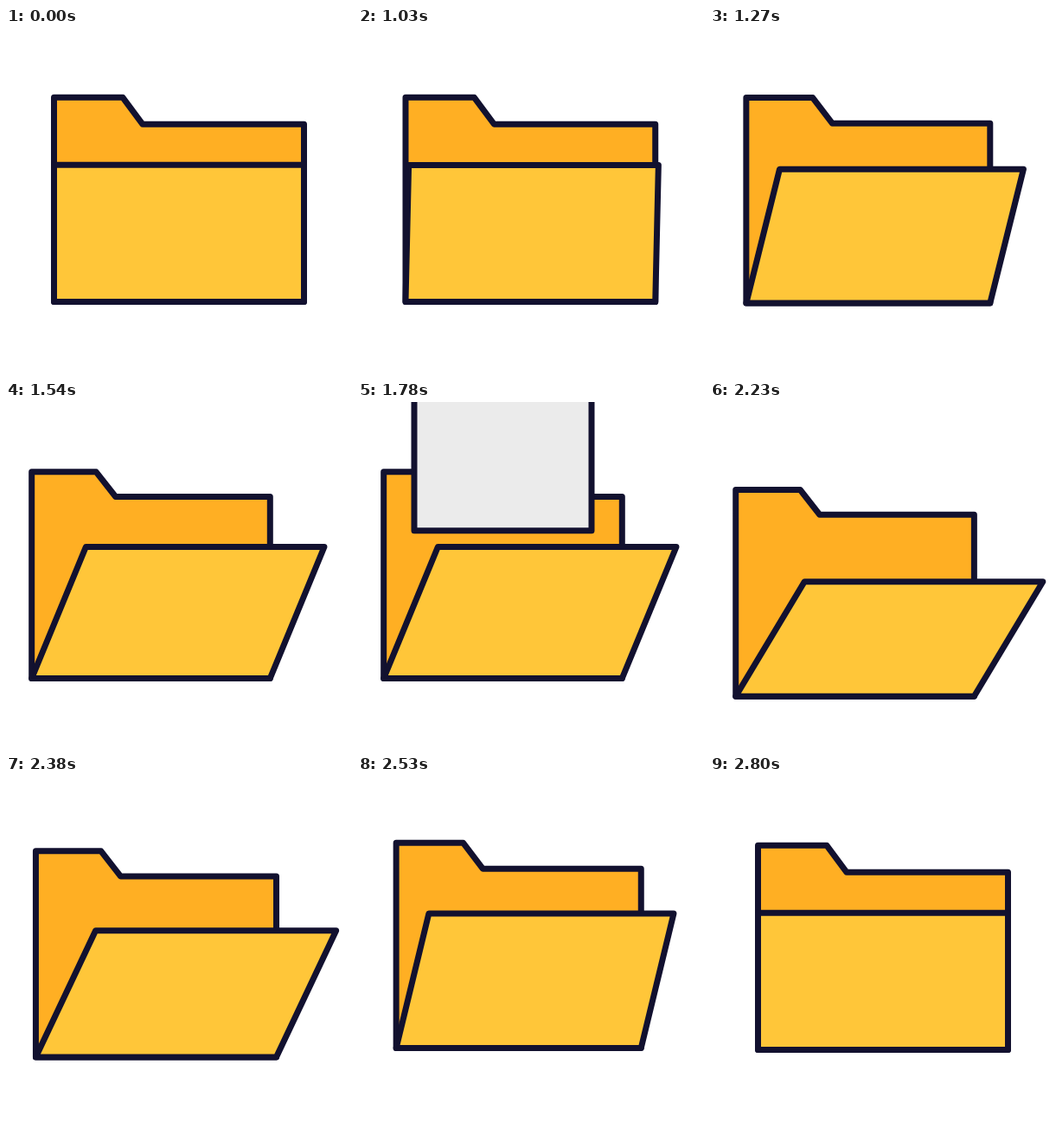
An HTML page that plays this animation: 400x400 px, repeating every 2830 ms.

```html
<!DOCTYPE html>
<html lang="en">
<head>
<meta charset="utf-8">
<title>Folder</title>
<style>
  html, body { margin: 0; width: 100%; height: 100%; overflow: hidden; background: #fff; }
  svg { display: block; width: 100%; height: 100%; }
  path { stroke: #12112f; stroke-width: 7; stroke-linejoin: round; }
</style>
</head>
<body>
<svg viewBox="0 0 400 400">
  <path id="back" fill="#ffaf23"/>
  <path id="paper" fill="#ebebeb"/>
  <path id="lid" fill="#ffc639"/>
</svg>
<script>
const LOOP = 2830, REST = 1030, STEP = 30;

const progress = (t, from, to) => Math.min(1, Math.max(0, (t - from) / (to - from)));
const ease = (t, from, to) => (1 - Math.cos(Math.PI * progress(t, from, to))) / 2;
// Starts at full speed and comes to rest.
const glide = (t, from, to) => {
  const u = progress(t, from, to);
  return u + u * u - u * u * u;
};

const [back, paper, lid] = ['back', 'paper', 'lid'].map(id => document.getElementById(id));
const draw = (path, ...points) => path.setAttribute('d', 'M' + points.join('L') + 'Z');

function render(t) {
  const close = ease(t, 2215, 2800);
  const open = ease(t, 980, 1540) - close;
  const hit = ease(t, 1930, 2200);

  // The folder sinks under the paper, springs up and settles.
  const bottom = 316.5 + 3 * open + 24 * ease(t, 1840, 2140)
    - 27.4 * ease(t, 2140, 2540) + 3.4 * ease(t, 2540, 2800);
  const left = 55.5 - 25.8 * open, right = 344.5 - 39.2 * open;
  const top = bottom - 236.2 - 2.5 * open, shoulder = top + 31 - 2.3 * open;
  draw(back, [left, bottom], [left, top], [left + 79.5 - 5 * open, top],
    [left + 102.5 - 5.5 * open, shoulder], [right, shoulder], [right, bottom]);

  const sheet = -205 + 505 * ease(t, 1540, 2185);
  const sheetEnd = Math.min(sheet + 200, bottom - 4);
  draw(paper, [65, sheet], [270, sheet], [270, sheetEnd], [65, sheetEnd]);
  paper.style.display = t > 1540 && t < 2200 ? '' : 'none';

  const angle = (22.4 * glide(t, 1000, 1540) + 8.6 * hit) * (1 - close);
  const height = 158.2 - 6.2 * open - 20 * (hit - ease(t, 2200, 2500));
  const lean = height * Math.tan(angle * Math.PI / 180), lidTop = bottom - height;
  draw(lid, [left, bottom], [left + lean, lidTop], [right + lean, lidTop], [right, bottom]);
}

const start = performance.now();
function tick() {
  const t = (performance.now() - start) % LOOP;
  render(t < REST ? 0 : REST + Math.floor((t - REST) / STEP) * STEP);
  requestAnimationFrame(tick);
}
tick();
</script>
</body>
</html>
```
